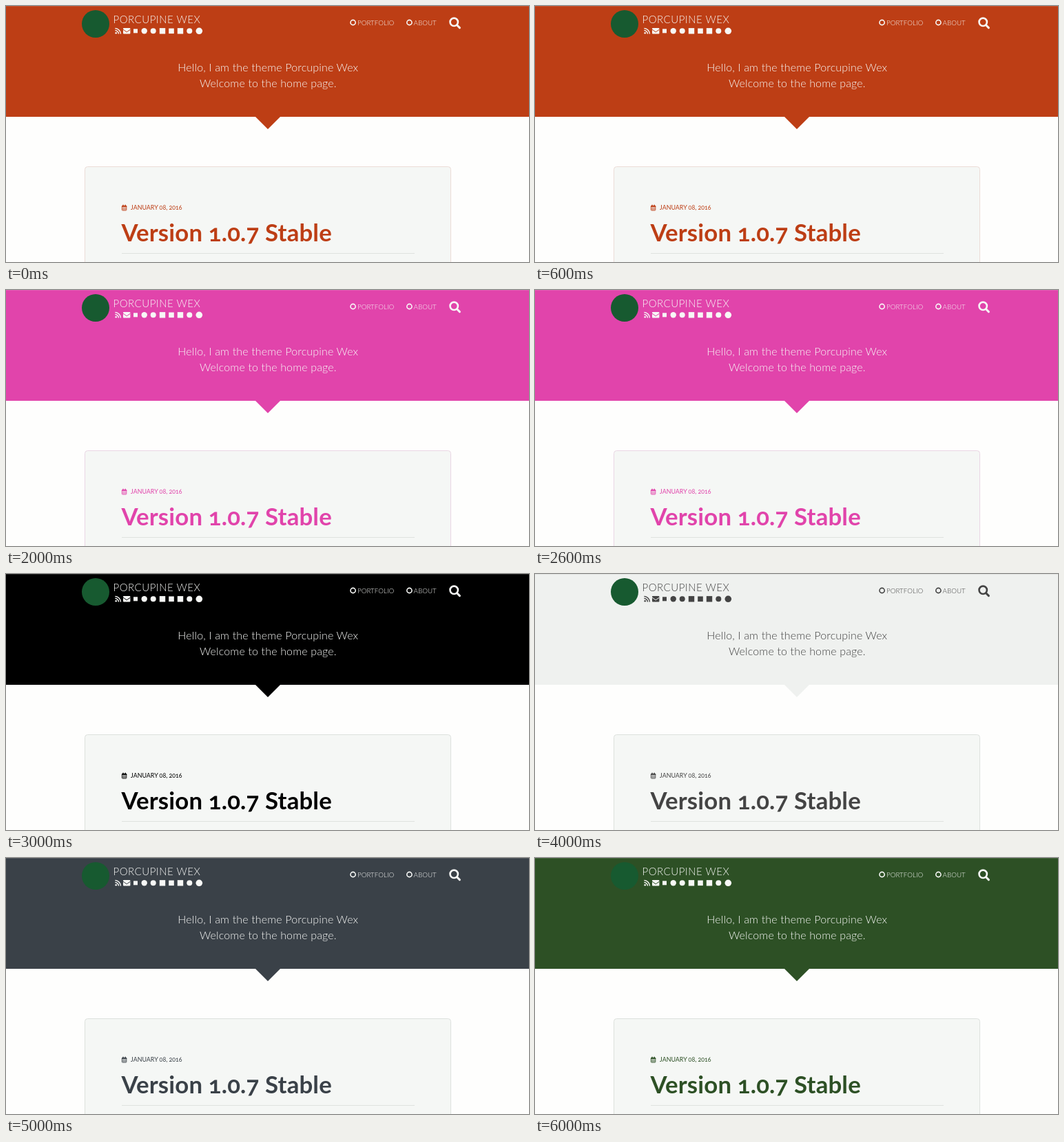
These frames come from a looping animation (759 by 372 pixels, 7 s). An HTML page:

```html
<!DOCTYPE html>
<html lang="en">
<head>
<meta charset="utf-8">
<title>Theme colours</title>
<style>
  html, body { margin: 0; width: 100%; height: 100%; overflow: hidden; background: #fefefd; }
  svg { display: block; width: 759px; height: 372px; }
  text { font-family: Lato, "Open Sans", sans-serif; font-variant-numeric: oldstyle-nums; white-space: pre; }
  .head { fill: var(--head); }
  .fg { fill: var(--fg); }
  .fgline { fill: none; stroke: var(--fg); }
  .ink { fill: var(--ink); }
  .inkline { fill: none; stroke: var(--ink); }
  .light { font-weight: 300; }
  .hello { font-size: 16px; letter-spacing: .15px; text-anchor: middle; }
  .menu { font-size: 9.8px; }
</style>
</head>
<body>
<svg id="stage" viewBox="0 0 759 372">
  <rect width="759" height="372" fill="#fefefd"/>

  <path class="head" d="M0 0H759V161H398L380 179L362 161H0Z"/>
  <rect width="759" height="1" fill="var(--edge)"/>

  <circle cx="130" cy="26" r="20" fill="#175a30"/>
  <text class="fg light" x="155.5" y="25" font-size="15" letter-spacing=".5">PORCUPINE WEX</text>

  <g id="social" class="fg">
    <circle cx="159.7" cy="39.2" r="1.3"/>
    <path class="fgline" stroke-width="1.5" d="M158.4 35.6a5 5 0 0 1 5 5M158.4 32.6a8 8 0 0 1 8 8"/>
    <rect x="170" y="32" width="10.4" height="8.6" rx="1"/>
    <path fill="none" stroke="var(--head)" d="M170 34.2L175.2 37.8L180.4 34.2"/>
  </g>

  <g class="fgline" stroke-width="1.6">
    <circle cx="503.6" cy="24" r="3.6"/>
    <circle cx="585.4" cy="24" r="3.6"/>
  </g>
  <text class="fg light menu" x="510" y="27.6">PORTFOLIO</text>
  <text class="fg light menu" x="591.6" y="27.6">ABOUT</text>
  <g class="fgline" stroke-width="2.6">
    <circle cx="650.2" cy="23.3" r="5.7"/>
    <path stroke-width="3" stroke-linecap="round" d="M654.8 28L658.4 31.6"/>
  </g>

  <text class="fg light hello" x="380.3" y="95">Hello, I am the theme Porcupine Wex</text>
  <text class="fg light hello" x="380.3" y="118">Welcome to the home page.</text>

  <rect x="114.5" y="233.5" width="531" height="160" rx="4" fill="#f5f7f5" stroke="var(--border)"/>

  <g>
    <rect class="inkline" x="168.4" y="290.4" width="6.4" height="6.6" rx=".6" stroke-width=".9"/>
    <path class="inkline" stroke-width="1.4" d="M168 291.3H175.2M170 288.8V291M173.2 288.8V291"/>
    <path class="inkline" stroke-width=".5" d="M168.5 293.6H174.8M168.5 295.3H174.8M170.5 292V297M172.7 292V297"/>
  </g>
  <text class="ink" x="181" y="296.4" font-size="8.9">JANUARY 08, 2016</text>
  <text class="ink" x="167.5" y="341.5" font-size="34.8" font-weight="700" letter-spacing=".15">Version 1.0.7 Stable</text>
  <rect x="168" y="359" width="425" height="1" fill="#dfe2df"/>
</svg>
<script>
  const STEP = 1000;
  const PALE = "#f7f8f6";
  const GREY = "#dde1dd";
  const stage = document.getElementById("stage");

  const theme = (head, edge, border = GREY, fg = PALE, ink = head) =>
    ({ head, edge, border, fg, ink });

  const themes = [
    theme("#bd3e15", "#c4532e", "#ecdcd7"),
    theme("#ab1218", "#b42c31", "#efcfd0"),
    theme("#e144ab", "#e45cb5", "#ead6e4"),
    theme("#000000", "#202020"),
    theme("#eff1ef", "#e2e4e2", GREY, "#444444", "#444444"),
    theme("#3a4148", "#51575d"),
    theme("#2d5025", "#44633d")
  ];

  // Plain badges: centre x, half size, round or square
  const badges = [
    [188, 3, 0], [200.7, 4.2, 1], [213.7, 4, 1], [227, 4.2, 0],
    [240, 3.8, 0], [253, 4.2, 0], [266.3, 4, 1], [280.3, 4.8, 1]
  ];

  function addBadge([x, r, round]) {
    const el = document.createElementNS(stage.namespaceURI, "rect");
    const attrs = { x: x - r, y: 36.3 - r, width: 2 * r, height: 2 * r, rx: round ? r : 0 };
    for (const key in attrs) el.setAttribute(key, attrs[key]);
    document.getElementById("social").append(el);
  }

  let shown = -1;
  function draw(time) {
    const index = Math.floor(time / STEP) % themes.length;
    if (index === shown) return;
    shown = index;
    for (const [key, colour] of Object.entries(themes[index])) {
      stage.style.setProperty("--" + key, colour);
    }
  }

  function tick() {
    draw(performance.now() - start);
    requestAnimationFrame(tick);
  }

  badges.forEach(addBadge);
  const start = performance.now();
  tick();
</script>
</body>
</html>
```
